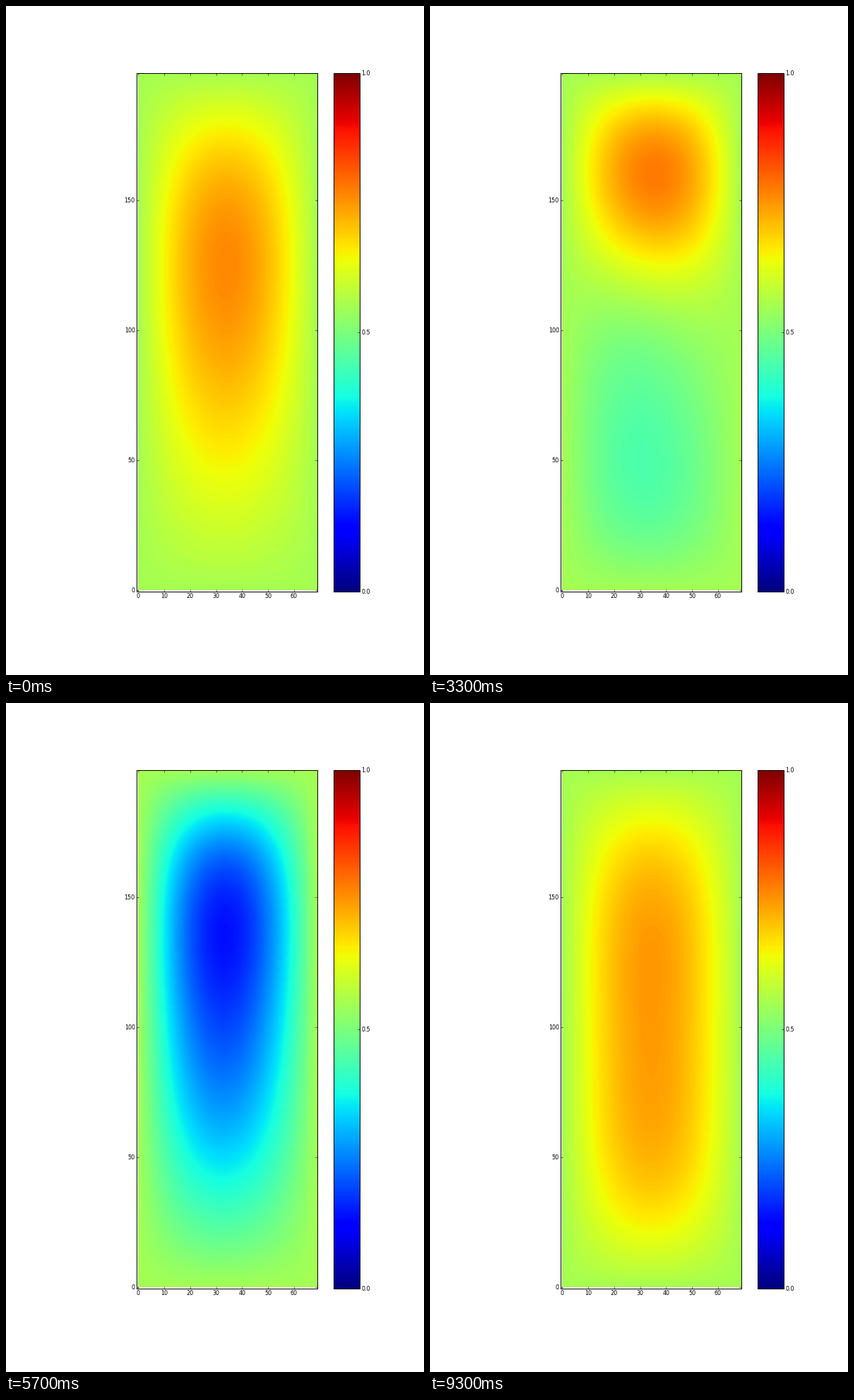
Recreate the animation shown at these times as a matplotlib script. Size 592x947 px, loop 9600 ms.

```python
import numpy as np
import matplotlib.pyplot as plt
from matplotlib.animation import FuncAnimation

W, H, DPI = 592, 947, 64
FRAMES, INTERVAL = 32, 300
PX = 72 / DPI            # one pixel in points
NX, NY = 69, 199         # grid extent
REST = 0.55              # value on the fixed border

# Mode strengths at a few moments. Columns: the first four vertical modes,
# then a slight left-right tilt.
TIMES = np.array([0, 7, 11, 15, 19, 23, 31], float)
MODES = np.array([
    [0.200, -0.045, 0.006, 0.000, 0.003],
    [0.3715, -0.1125, 0.0124, 0.000, 0.000],
    [0.021, -0.159, 0.054, -0.026, -0.012],
    [-0.585, 0.152, -0.058, -0.020, -0.013],
    [-0.389, 0.094, -0.035, 0.010, -0.012],
    [-0.015, 0.049, 0.0035, 0.000, -0.006],
    [0.221, -0.006, 0.025, 0.000, 0.000],
])


def spline_curvature(t, v):
    """Second derivatives of the natural cubic spline through (t, v)."""
    n, h = len(t), np.diff(t)
    a, b = np.eye(n), np.zeros_like(v)
    for i in range(1, n - 1):
        a[i, i - 1:i + 2] = h[i - 1], 2 * (h[i - 1] + h[i]), h[i]
        b[i] = 6 * ((v[i + 1] - v[i]) / h[i] - (v[i] - v[i - 1]) / h[i - 1])
    return np.linalg.solve(a, b)


CURV = spline_curvature(TIMES, MODES)


def modes_at(t):
    i = min(np.searchsorted(TIMES, t, side="right") - 1, len(TIMES) - 2)
    h = TIMES[i + 1] - TIMES[i]
    q = (t - TIMES[i]) / h
    p = 1 - q
    return (p * MODES[i] + q * MODES[i + 1]
            + ((p**3 - p) * CURV[i] + (q**3 - q) * CURV[i + 1]) * h * h / 6)


def midpoints(n):
    return (np.arange(n) + 0.5) / n


sx = np.pi * midpoints(254)
sy = np.pi * midpoints(732)
across = np.sin(sx)
tilt = np.outer(np.sin(sy), np.sin(2 * sx))
along = np.array([np.sin(n * sy) for n in range(1, 5)])


def field(t):
    m = modes_at(t)
    return REST + np.outer(m[:4] @ along, across) + m[4] * tilt


def style(ax):
    ax.tick_params(direction="in", length=2.67 * PX, width=0.6 * PX,
                   pad=2.67 * PX, labelsize=8 * PX)
    for side in ax.spines.values():
        side.set_linewidth(PX)


plt.rcParams["font.family"] = "DejaVu Sans"
fig = plt.figure(figsize=(W / DPI, H / DPI), dpi=DPI, facecolor="white")

bottom, height = 0.125, 0.775
right = 0.745
width = height * H * (NX + 0.5) / (NY + 0.5) / W
ax = fig.add_axes([right - width, bottom, width, height])
image = ax.imshow(field(0), cmap="jet", vmin=0, vmax=1, origin="lower",
                  extent=(0, NX, 0, NY), aspect="auto",
                  interpolation="bilinear")
ax.set(xlim=(-0.5, NX), ylim=(-0.5, NY),
       xticks=range(0, 61, 10), yticks=range(0, 151, 50))
ax.tick_params(top=True, right=True)
style(ax)

bar = fig.add_axes([0.78375, bottom, height * H / 20 / W, height])
bar.imshow(midpoints(256)[:, None], cmap="jet", vmin=0, vmax=1,
           origin="lower", extent=(0, 1, 0, 1), aspect="auto",
           interpolation="nearest")
bar.set(xticks=[], yticks=[0, 0.5, 1], yticklabels=["0.0", "0.5", "1.0"])
bar.yaxis.tick_right()
style(bar)


def update(i):
    image.set_data(field(i))
    return (image,)


anim = FuncAnimation(fig, update, frames=FRAMES, interval=INTERVAL,
                     repeat=True, repeat_delay=0, blit=False)
plt.show()
```
